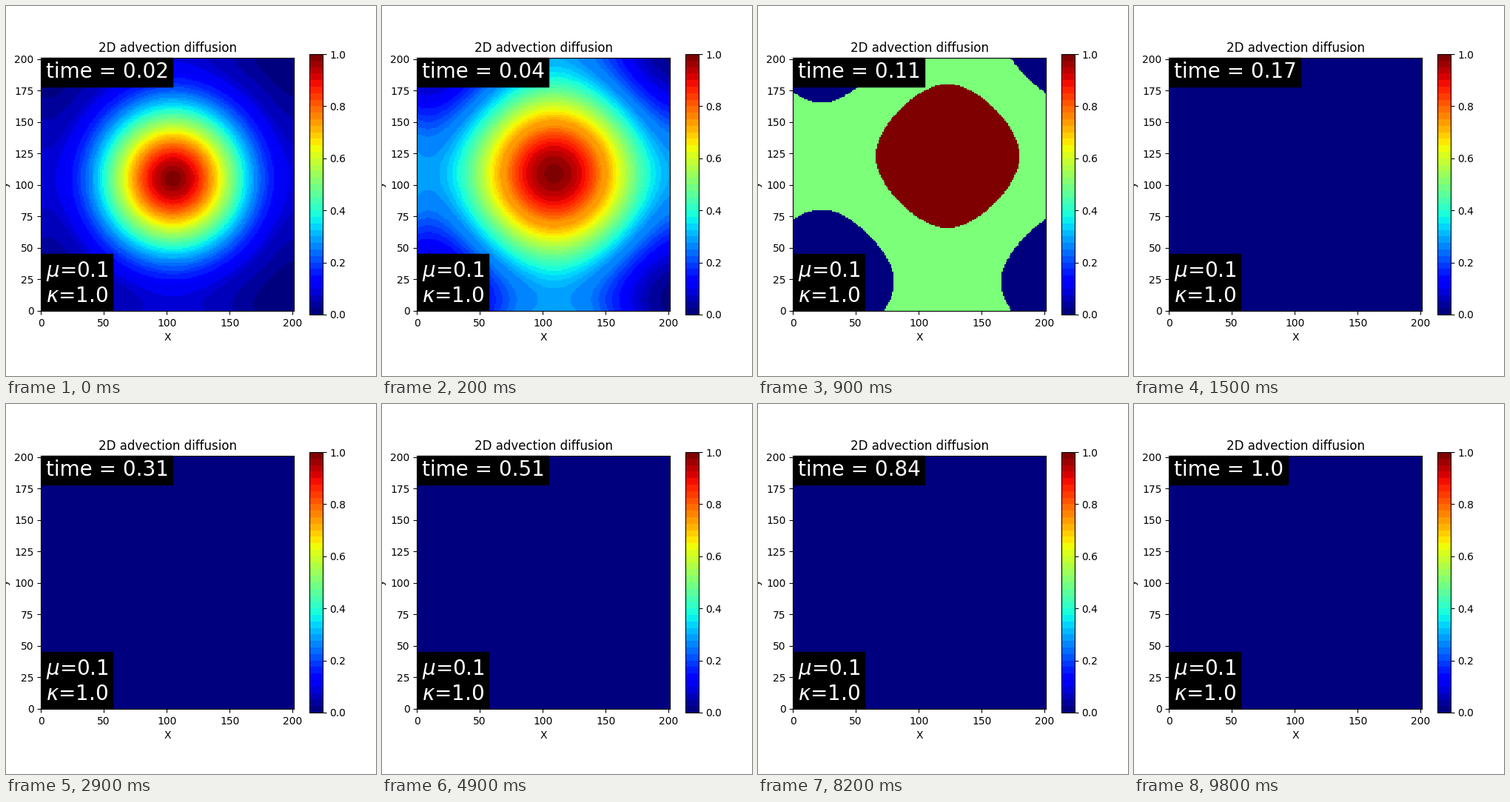
These frames come from a looping animation (500x500 px, 9900 ms). A matplotlib script:

```python
import numpy as np
import matplotlib.pyplot as plt
from matplotlib.animation import FuncAnimation
from matplotlib.cm import ScalarMappable

SIZE = 500
DPI = 100
FRAMES = 99
INTERVAL = 100

CELLS = 201      # cells drawn along each axis
PERIOD = 200     # wrap length of the domain, in cells
MEAN = 25        # mean concentration, in rounding steps
SHADES = 40      # most shades used for one picture


def box(left, top, right, bottom):
    """Pixel box, measured from the top left, as a figure rectangle."""
    return [left / SIZE, 1 - bottom / SIZE,
            (right - left) / SIZE, (bottom - top) / SIZE]


def profile(time):
    """Periodic heat kernel along one axis, carried with the flow."""
    variance = 2 * time + 0.0003
    q = np.exp(-2 * np.pi**2 * variance)
    phase = 2 * np.pi * (np.arange(CELLS) + 0.5 - 101 - 200 * time) / PERIOD
    return 1 + 2 * sum(q**(k * k) * np.cos(k * phase) for k in range(1, 7))


def field(time):
    """Rounded concentration, rescaled to 0..1."""
    line = profile(time)
    levels = np.round(MEAN * np.outer(line, line))
    low, high = levels.min(), levels.max()
    if high == low:
        return np.zeros_like(levels)
    scaled = (levels - low) / (high - low)
    if high - low >= SHADES:
        scaled = np.round(scaled * (SHADES - 1)) / (SHADES - 1)
    return scaled


def label(x, y, text):
    """White text on a black box, at a pixel place from the top left."""
    return fig.text(x / SIZE, 1 - y / SIZE, text, fontsize=20, color="white",
                    ha="left", va="bottom",
                    bbox=dict(facecolor="black", edgecolor="black"))


plt.rcParams["font.family"] = "DejaVu Sans"
fig = plt.figure(figsize=(SIZE / DPI, SIZE / DPI), dpi=DPI, facecolor="white")

ax = fig.add_axes(box(47.15, 70.1, 388.95, 411.9))
image = ax.imshow(field(0.02), cmap="jet", vmin=0, vmax=1, origin="lower",
                  extent=(0, CELLS, 0, CELLS), interpolation="nearest",
                  aspect="auto")
ax.set_xticks(range(0, 201, 50))
ax.set_yticks(range(0, 201, 25))
ax.set_title("2D advection diffusion")
ax.set_xlabel("X")
ax.set_ylabel("y")

bar_ax = fig.add_axes(box(410.3, 65.1, 427.9, 416.9))
bar = fig.colorbar(ScalarMappable(cmap=plt.get_cmap("jet", SHADES)),
                   cax=bar_ax)
bar.set_ticks(np.linspace(0, 1, 6))

clock = label(54, 103.1, "")
label(54, 405.9, "$\\mu$=0.1\n$\\kappa$=1.0")


def update(frame):
    time = round(0.02 + 0.01 * frame, 2)
    image.set_data(field(time))
    clock.set_text(f"time = {time}")
    return image, clock


anim = FuncAnimation(fig, update, frames=FRAMES, interval=INTERVAL,
                     repeat=True, repeat_delay=0, blit=False)
plt.show()
```
